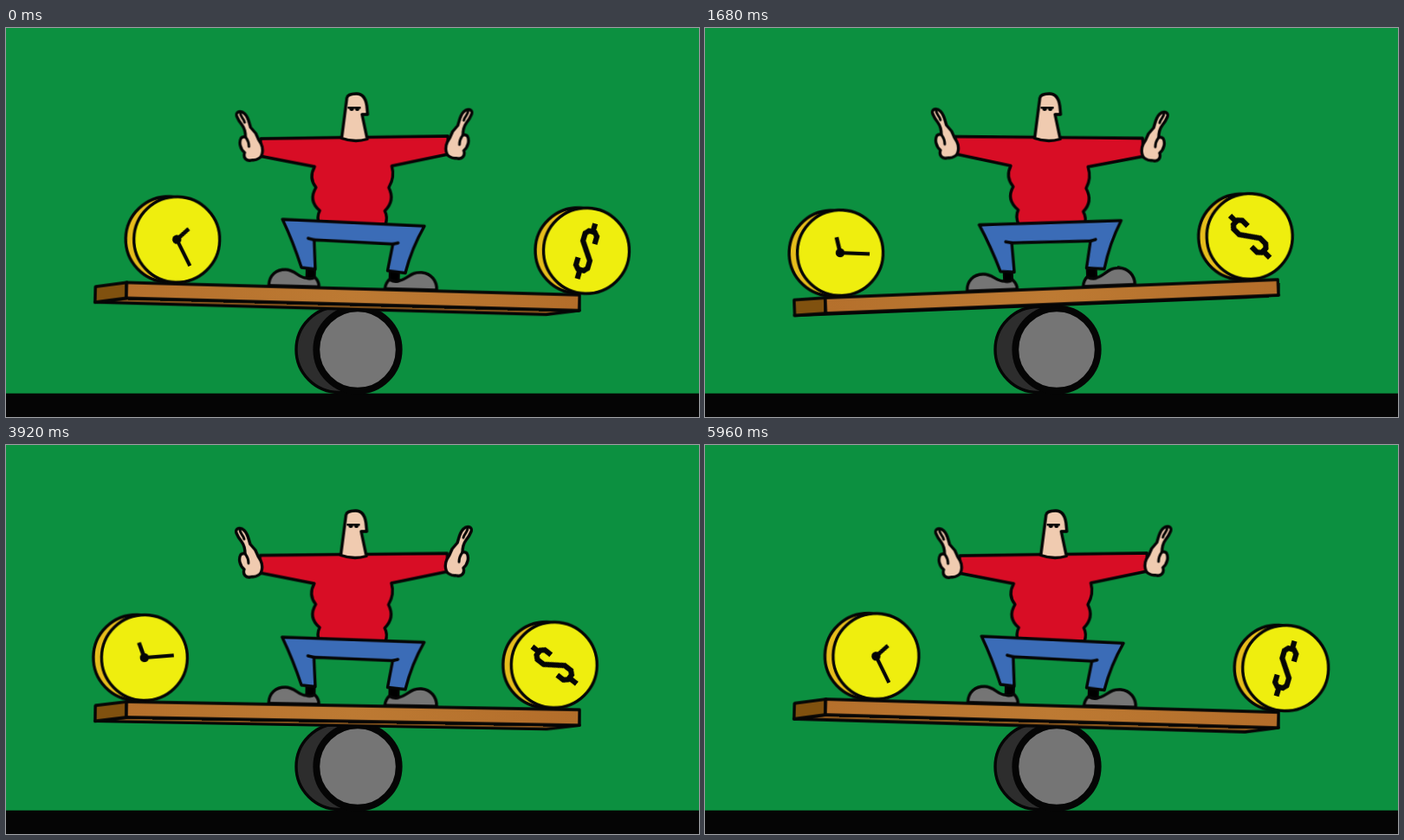
Write an HTML page without scripts that moves like this. It is 800 px wide and 450 px high and loops after 6 s.

```html
<!DOCTYPE html>
<html lang="en">
<head>
<meta charset="utf-8">
<title>Time and money balance</title>
<style>
html, body { margin: 0; width: 100%; height: 100%; overflow: hidden; background: #0c9040; }
svg { display: block; width: 800px; height: 450px; }
.ink { stroke: #050505; stroke-width: 3.4; stroke-linejoin: round; stroke-linecap: round; }
.line { fill: none; }
.skin { fill: #f0cbb0; }
.shirt { fill: #d80d25; }
.jeans { fill: #3b6cb7; }
.grey { fill: #757575; }
.gold { fill: #efee0e; }
.rim { fill: #e6bd1c; }

/* everything that follows the tilt shares one timing */
.tilt { animation: swing 6s -940ms infinite; }
.board { --hi: translateY(.6px) rotate(2.75deg); --lo: translateY(.6px) rotate(-2.7deg); transform-origin: 400px 312px; }
.end { --hi: skewY(-11.3deg); --lo: skewY(-.8deg); transform-origin: 139px 310px; }
.under { --hi: scaleY(1); --lo: scaleY(.07); transform-origin: 400px 319px; }
.under path { vector-effect: non-scaling-stroke; }
.legs { --hi: skewX(-1.96deg) skewY(3.2deg); --lo: skewX(1.85deg) skewY(-3.05deg); transform-origin: 400px 281px; }
.torso { --hi: skewX(-2.1deg) skewY(-.92deg); --lo: skewX(2deg) skewY(.87deg); transform-origin: 400px 224px; }
.hands { --hi: translateX(2.6px) skewY(-.92deg); --lo: translateX(-2.6px) skewY(.87deg); transform-origin: 400px 224px; }
.head { --hi: translateX(4.6px); --lo: translateX(-5.2px); }
@keyframes swing {
  0%, 100% { transform: var(--hi); animation-timing-function: cubic-bezier(.333, 0, .667, 1); }
  52.3% { transform: var(--lo); animation-timing-function: cubic-bezier(.25, 0, .667, 1); }
}

.slide { animation: slide 6s -100ms infinite; }
.roll { animation: roll 6s -100ms infinite; }
@keyframes slide {
  0%, 100% { transform: translateX(195.6px); animation-timing-function: cubic-bezier(.333, 0, .667, 1); }
  50% { transform: translateX(137.4px); animation-timing-function: cubic-bezier(.18, 0, .655, 1); }
}
@keyframes roll {
  0%, 100% { transform: rotate(0deg); animation-timing-function: cubic-bezier(.333, 0, .667, 1); }
  53% { transform: rotate(-98deg); animation-timing-function: cubic-bezier(.18, 0, .655, 1); }
}
</style>
</head>
<body>
<svg viewBox="0 0 800 450">
  <defs>
    <linearGradient id="wood">
      <stop offset="0" stop-color="#b5702c"/>
      <stop offset=".5" stop-color="#bd7a33"/>
      <stop offset="1" stop-color="#b36d2a"/>
    </linearGradient>
    <g id="coin" class="ink">
      <circle class="rim" cx="-9.5" r="49.5"/>
      <circle class="gold" r="49.5"/>
    </g>
    <g id="hand" class="ink">
      <path class="skin" d="M265 101C263 95 270 94 274 98C279 103 279 109 281 114L287 121C289 126 290 129 293 133C296 139 295 148 290 150C286 153 283 151 281 152C276 153 272 149 274 143C269 139 267 131 270 126Q272 124 275 125C275 119 274 115 271 111Q267 106 265 101Z"/>
      <path class="line" d="M275 125Q279 130 279 136M269 97C269 102 273 103 274 108" stroke-width="3"/>
    </g>
  </defs>

  <rect width="800" height="450" fill="#0c9040"/>
  <rect y="422.7" width="800" height="28" fill="#050505"/>

  <!-- roller -->
  <path class="ink" fill="#2d2d2d" d="M406 322.500H384.500A49.500 49.500 0 0 0 384.500 421.500H406Z"/>
  <circle class="grey" cx="406" cy="372" r="47.7" stroke="#050505" stroke-width="7.8"/>

  <!-- plank, shoes, coins -->
  <g class="tilt board">
    <g class="tilt under"><path class="ink" fill="#8a571d" d="M139 319H662L624 326.2H103Z"/></g>
    <g class="tilt end"><path class="ink" fill="#80510f" d="M139 301H103V319H139Z"/></g>
    <g class="ink">
      <path d="M346 279H356V291H346ZM442 279H453V291H442Z" stroke-width="2"/>
      <path class="grey" d="M303 300C303 288 311 281 322 281C333 281 337 290 346 290Q351 292 356 289Q361 294 361 300Z"/>
      <path class="grey" d="M437 300Q438 293 442 289Q449 293 454 290C463 288 467 279 479 280C490 281 497 289 497 300Z"/>
    </g>
    <path class="ink" fill="url(#wood)" d="M139 301H662V319H139Z"/>

    <g class="slide"><g transform="translate(0 249.700)">
      <use href="#coin"/>
      <g class="roll"><g transform="rotate(152.3)">
        <circle r="5.2" fill="#050505"/>
        <path d="M0 0V-34" stroke="#050505" stroke-width="4.2"/>
        <path d="M0 0V-18.5" stroke="#050505" stroke-width="4.8" transform="rotate(-105.5)"/>
      </g></g>
    </g></g>

    <g class="slide"><g transform="translate(473 249.700)">
      <use href="#coin"/>
      <g class="roll"><g transform="rotate(15)">
        <path fill="none" stroke="#050505" stroke-width="6.2" d="M7 -10V-19L3.500 -23H-3.500L-7 -19V-10L7 10V19L3.500 23H-3.500L-7 19V10M1 -23V-33M-1 23V34"/>
      </g></g>
    </g></g>
  </g>

  <!-- figure -->
  <g class="tilt torso">
    <path class="ink shirt" d="M292 127L387 126.5H415L508 126L509 147L444 160Q448 173 441 185Q449 200 437 212Q441 219 438 228H362Q358 218 362 211Q348 199 357 184Q348 173 355 160L291 147Z"/>
  </g>
  <g class="tilt hands">
    <use href="#hand"/>
    <use href="#hand" transform="matrix(-1 0 0 1 801 0)"/>
  </g>
  <g class="tilt head">
    <path class="ink skin" d="M385 127.500L391 81Q392 76 402 76C410 76 413 83 414 90L415 100H408.500L414.500 128.500Q400 133 385 127.500Z"/>
    <path d="M392 91H407V93.500H405.500A2.500 2.500 0 0 1 400.500 93.500H399A2.500 2.500 0 0 1 394 93.500H392Z" fill="#050505"/>
  </g>
  <g class="tilt legs">
    <path class="ink jeans" d="M318 224L482 226.500Q468 252 461 281.500L440.500 279.500L446 248.500L355 246.500L357 280.500L341 279Q331 250 318 224Z"/>
    <path class="ink line" d="M348 245L355 246.500M446 248.500L452 247" stroke-width="2.500"/>
  </g>
</svg>
</body>
</html>
```
